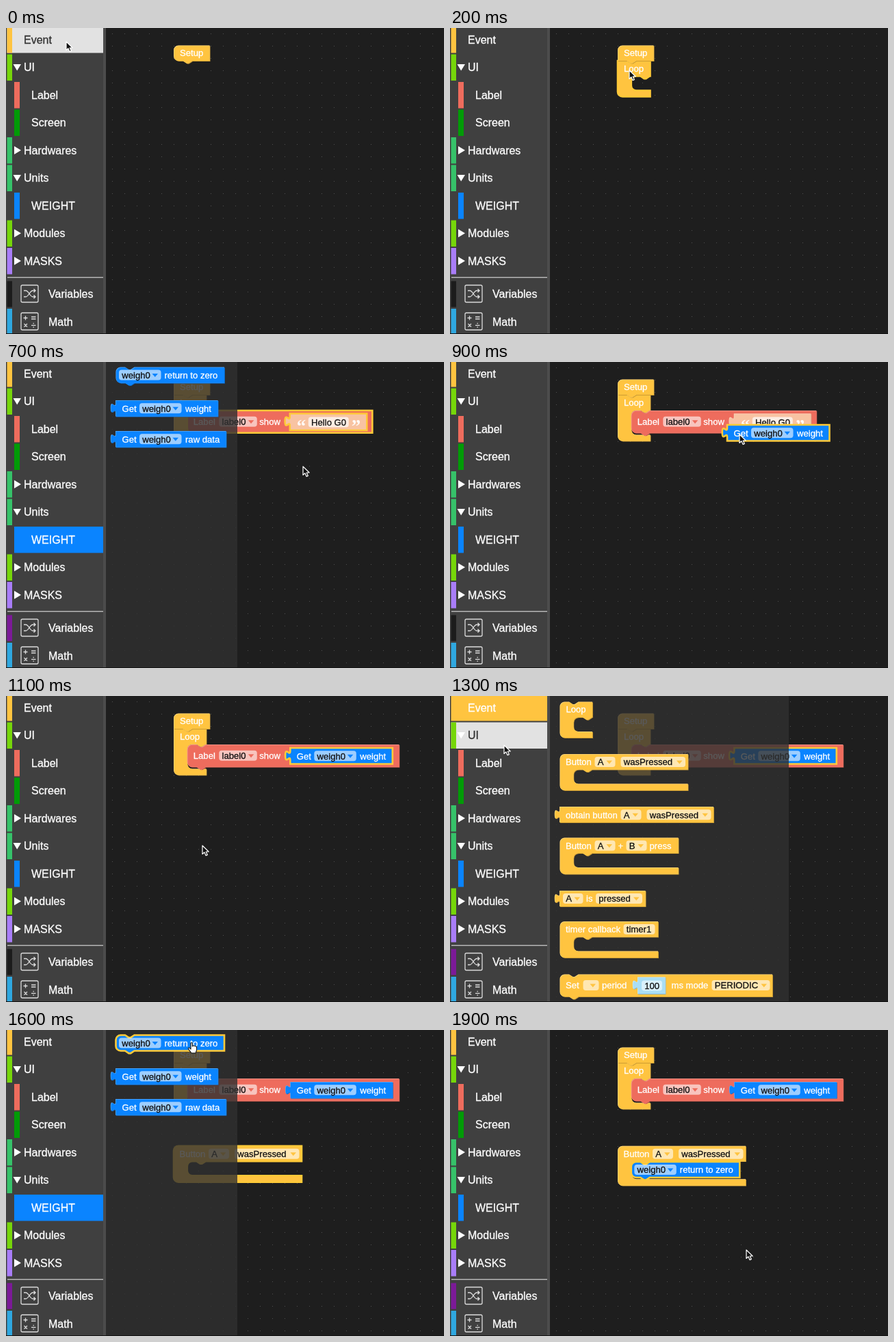
Recreate the animation shown at these times as an HTML page with a canvas. Size 640 by 448 pixels, loop 2 s.

```html
<!DOCTYPE html>
<html lang="en">
<head>
<meta charset="utf-8">
<title>Block editor</title>
<style>
  html, body { margin: 0; width: 100%; height: 100%; overflow: hidden; background: #1e1e1e; }
  canvas { display: block; width: 640px; height: 448px; }
</style>
</head>
<body>
<canvas id="stage" width="640" height="448"></canvas>
<script>
const c = document.getElementById('stage').getContext('2d');
const SANS = '"Liberation Sans", Arial, sans-serif';
const YELLOW = '#ffc440', RED = '#ee6c5d', BLUE = '#0a84ff', GREEN = '#36c269', LIME = '#76d60a';
const GLOW = '#ffca38', OLIVE = 'rgba(144,135,98,.65)', OLIVE_EDGE = '#a18c42';

// name, colour, indent, arrow (1 open, 2 closed)
const ROWS = [
  ['Event', YELLOW], ['UI', LIME, 0, 1], ['Label', RED, 1], ['Screen', '#009b06', 1],
  ['Hardwares', GREEN, 0, 2], ['Units', GREEN, 0, 1], ['WEIGHT', BLUE, 1],
  ['Modules', LIME, 0, 2], ['MASKS', '#a97df8', 0, 2]
];

function rect(x, y, w, h, fill) {
  c.fillStyle = fill;
  c.fillRect(x, y, w, h);
}
function text(str, x, y, fill = '#fff', size = 13.1) {
  c.font = size + 'px ' + SANS;
  c.fillStyle = c.strokeStyle = fill;
  c.lineWidth = 0.3;
  c.fillText(str, x, y);
  c.strokeText(str, x, y);
}
function poly(fill, ...points) {
  c.fillStyle = fill;
  c.beginPath();
  points.forEach(([x, y]) => c.lineTo(x, y));
  c.fill();
}
function at(x, y, draw) {
  c.save();
  c.translate(x, y);
  draw();
  c.restore();
}

// Block outlines
const NOTCH = 'l5.4 3.6h2.7l5.4-3.6', TAIL = 'l-5.4 3.6h-2.7l-5.4-3.6';

function statement(w, h, { mouth = 0, tl = 7, bl = 7, notch = true, tail = true } = {}) {
  const cavity = `V22.5H46.8${TAIL}h-6.3a7.2 7.2 0 0 0-7.2 7.2V${15.3 + mouth}a7.2 7.2 0 0 0 7.2 7.2H${w}`;
  return `M0 ${tl}a${tl} ${tl} 0 0 1 ${tl} ${-tl}` + (notch ? 'H13.5' + NOTCH : '') + `H${w}` +
    (mouth ? cavity : '') + `V${h}` + (tail ? 'H27' + TAIL : '') +
    `H${bl}a${bl} ${bl} 0 0 1 ${-bl} ${-bl}z`;
}
const value = (w, h) =>
  `M0 0H${w}V${h}H0V18c0-9-7.2 7.2-7.2-6.75s7.2 2.25 7.2-6.75z`;

function shape(d, fill, edge) {
  const path = new Path2D(d);
  const paint = (...fills) => fills.forEach(f => {
    c.fillStyle = f;
    c.fill(path);
  });
  if (edge) {
    paint(fill);
    c.strokeStyle = edge;
    c.lineWidth = 2.6;
    c.stroke(path);
    return;
  }
  // Bevel: dark below right, light above left
  at(0.9, 0.9, () => paint(fill, 'rgba(0,0,0,.2)'));
  paint(fill, 'rgba(255,255,255,.3)');
  at(0, 0, () => {
    c.clip(path);
    c.translate(0.7, 0.7);
    paint(fill);
  });
}
function field(str, x, y, w, arrow, fill = 'rgba(255,255,255,.6)') {
  c.fillStyle = fill;
  c.beginPath();
  c.roundRect(x, y - 7.5, w, 15, 4);
  c.fill();
  text(str, x + 4.3, y + 4.7, '#111');
  if (arrow) poly(arrow, [x + w - 13, y - 2], [x + w - 4.5, y - 2], [x + w - 8.75, y + 3]);
}
const say = (str, x, y) => text(str, x, y + 4.7);

// Blocks
const setup = joined => at(245, 25.5, () => {
  shape(statement(52.5, 22.5, { notch: false, bl: joined ? 0 : 7 }), YELLOW);
  say('Setup', 9, 11);
});
function loop(x, y, mouth, tl, edge) {
  at(x, y, () => {
    shape(statement(47.5, 31.5 + mouth, { mouth, tl, tail: false }), YELLOW, edge);
    say('Loop', 9, 11);
  });
}
function hello(x, y, fill, edge) {
  at(x, y, () => {
    shape(value(112.5, 24.5), fill, edge);
    field('Hello G0', 27, 12.5, 59, null, 'rgba(255,255,255,.7)');
    c.font = 'bold 27px "Liberation Serif", serif';
    c.fillStyle = 'rgba(255,255,255,.9)';
    c.fillText('“', 10, 27.5);
    c.fillText('”', 90, 27.5);
  });
}
function weighValue(x, y, tail, w, edge) {
  at(x, y, () => {
    shape(value(w, 23.5), BLUE, edge);
    say('Get', 9.5, 11.8);
    field('weigh0', 35, 11.8, 61.5, BLUE);
    say(tail, 102, 11.8);
  });
}
const getWeight = (x, y, edge) => weighValue(x, y, 'weight', 149.5, edge);

function label(x, y, child, { fill = RED, childFill = '#f8c3a2', edge, childEdge } = {}) {
  at(x, y, () => {
    shape(statement(child === 'get' ? 309.5 : 270.5, 32.8), fill, edge);
    say('Label', 9, 16.3);
    field('label0', 46.5, 16.3, 55.5, RED);
    say('show', 105.5, 16.3);
    if (child === 'get') getWeight(150.5, 5, childEdge);
    else hello(150, 4.5, childFill, edge);
  });
}
function zero(x, y, edge) {
  at(x, y, () => {
    shape(statement(158.5, 23), BLUE, edge);
    field('weigh0', 4.5, 11.5, 61.5, BLUE);
    say('return to zero', 71, 11.5);
  });
}
function button(x, y, mouth = 21, edge) {
  at(x, y, () => {
    shape(statement(187, 32 + mouth, { mouth, notch: false, tail: false }), YELLOW, edge);
    say('Button', 8.5, 11.5);
    field('A', 51, 11.5, 30, YELLOW);
    field('wasPressed', 89, 11.5, 94.5, YELLOW);
  });
}

// Flyouts: right edge and contents
const FLYOUTS = {
  event: [495, () => {
    loop(160.5, 8.5, 21, 7);
    button(160.5, 85);
    at(160, 162, () => {
      shape(value(225, 23), YELLOW);
      say('obtain button', 9, 11.8);
      field('A', 89.5, 11.8, 30, YELLOW);
      field('wasPressed', 127.5, 11.8, 94, YELLOW);
    });
    at(160.5, 207.5, () => {
      shape(statement(173, 53, { mouth: 21, notch: false, tail: false }), YELLOW);
      say('Button', 8.5, 11.5);
      field('A', 51, 11.5, 30, YELLOW);
      say('+', 85, 11.5);
      field('B', 97, 11.5, 30, YELLOW);
      say('press', 131, 11.5);
    });
    at(160, 285, () => {
      shape(value(125.5, 23), YELLOW);
      field('A', 5, 11.5, 29.5, YELLOW);
      say('is', 39, 11.5);
      field('pressed', 53, 11.5, 68, YELLOW);
    });
    at(160.5, 330, () => {
      shape(statement(143.5, 53, { mouth: 21, notch: false, tail: false }), YELLOW);
      say('timer callback', 8.5, 11.5);
      field('timer1', 93, 11.5, 46);
    });
    at(160.5, 407.5, () => {
      shape(statement(310.5, 32.5), YELLOW);
      say('Set', 8.5, 16);
      field('', 34, 16, 23, YELLOW);
      say('period', 61.5, 16);
      at(113.5, 4, () => {
        shape(value(40.5, 24.5), '#a9def5');
        field('100', 6, 12.5, 30, null, '#d9f1fb');
      });
      say('ms mode', 163, 16);
      field('PERIODIC', 222, 16, 85, YELLOW);
    });
  }],
  label: [444, () => label(160.5, 8, 'hello')],
  weight: [338, glow => {
    zero(160.5, 7.5, glow);
    getWeight(160, 56);
    weighValue(160, 101, 'raw data', 161.5);
  }]
};

function sidebar({ hover, sel, dark }) {
  rect(0, 0, 142, 448, '#404040');
  rect(142, 0, 4, 448, '#4c4c4c');
  ROWS.forEach(([name, colour, sub, arrow], i) => {
    const y = -2 + 40.5 * i, x = sub ? 12 : 1.5;
    if (i === hover) rect(x, y, 142 - x, 38.5, '#e2e2e2');
    rect(x, y, i === sel ? 142 - x : sub ? 8 : 7.5, 38.5, colour);
    const m = y + 19;
    if (arrow === 1) poly('#fff', [10.5, m - 4.5], [22, m - 4.5], [16.2, m + 5]);
    if (arrow === 2) poly('#fff', [12, m - 6], [22, m], [12, m + 6]);
    text(name, sub ? 37 : 26, m + 5.8, i === hover ? '#333' : '#fff', 16);
  });
  rect(2, 364.5, 140, 1.5, '#b5b5b5');
  rect(1.5, 370.5, 7.5, 38, dark ? '#1c1c1c' : '#7c1a98');
  rect(1.5, 411, 7.5, 36, '#2fa8e0');
  text('Variables', 62, 395, '#fff', 16);
  text('Math', 62, 435.5, '#fff', 16);

  c.strokeStyle = '#dcdcdc';
  c.lineWidth = 1.3;
  c.stroke(new Path2D('M24 376.5h21a2 2 0 0 1 2 2v21a2 2 0 0 1-2 2h-21a2 2 0 0 1-2-2v-21a2 2 0 0 1 2-2z' +
    'M24 417h21a2 2 0 0 1 2 2v21a2 2 0 0 1-2 2h-21a2 2 0 0 1-2-2v-21a2 2 0 0 1 2-2z' +
    'M26 384.5h3c4 0 6 9 10 9h4M26 393.5h3c4 0 6-9 10-9h4M40.5 382l2.5 2.5-2.5 2.5M40.5 391l2.5 2.5-2.5 2.5' +
    'M25.5 424.5h6M28.5 421.5v6M37 423h6.5M37 426h6.5M26.5 433l4.5 4.5M31 433l-4.5 4.5M37 435.3h6.5' +
    'M40.2 431.8v1.4M40.2 437.3v1.4'));
}

function cursor([x, y], hand) {
  const arrow = 'M0 0V12.5L2.9 9.8L5 14.6L7.3 13.6L5.2 9H9.2z';
  const grip = 'M-3-5c0-2 2.4-2 2.4 0v4l.6-1 2 .2 2 .6 1.5 1v5l-1.5 4h-6l-4.5-6c-.6-1.8 1.3-2.4 2.3-1l1.2 1.2z';
  at(x, y, () => {
    const path = new Path2D(hand ? grip : arrow);
    c.fillStyle = hand ? '#fff' : '#111';
    c.strokeStyle = hand ? '#222' : '#fff';
    c.lineWidth = 1.2;
    c.lineJoin = 'round';
    c.fill(path);
    c.stroke(path);
  });
}

// One pose per tenth of a second
const ghost = { fill: OLIVE, childFill: 'transparent', edge: OLIVE_EDGE };
const withLabel = { loop: 1, child: 'hello' };
const withGet = { loop: 1, child: 'get' };
const POSES = [
  { hover: 0, cur: [88, 20], dark: 1 },
  { sel: 0, fly: 'event', cur: [180, 22], hand: 1, dark: 1 },
  { loop: 1, glow: 'loop', cur: [262, 62], dark: 1 },
  { loop: 1, sel: 2, fly: 'label', cur: [194, 31], hand: 1, dark: 1 },
  { loop: 1, drag: () => label(195.8, 60, 'hello', ghost), cur: [229, 82], dark: 1 },
  { ...withLabel, glow: 'label', cur: [299, 96], dark: 1 },
  { ...withLabel, glow: 'label', hover: 6, cur: [100, 256] },
  { ...withLabel, glow: 'label', sel: 6, fly: 'weight', cur: [434, 153] },
  { ...withLabel, drag: () => getWeight(270, 118, GLOW), cur: [288, 132] },
  { ...withLabel, drag: () => getWeight(405, 92, GLOW), cur: [423, 106], dark: 1 },
  { ...withGet, glow: 'get', cur: [432, 95], dark: 1 },
  { ...withGet, glow: 'get', cur: [287, 219], dark: 1 },
  { ...withGet, glow: 'get', hover: 0, cur: [80, 22] },
  { ...withGet, glow: 'get', sel: 0, hover: 1, fly: 'event', cur: [79, 72] },
  { ...withGet, glow: 'get', sel: 0, fly: 'event', cur: [188, 98], hand: 1 },
  { ...withGet, button: 1, glow: 'button', cur: [272, 184] },
  { ...withGet, button: 1, glow: 'button', sel: 6, fly: 'weight', flyGlow: GLOW, cur: [273, 25], hand: 1 },
  { ...withGet, button: 1, drag: () => zero(272, 178, GLOW), cur: [384, 196] },
  { ...withGet, button: 1, zero: 1, glow: 'zero', cur: [378, 210] },
  { ...withGet, button: 1, zero: 1, glow: 'zero', cur: [433, 322] }
];

function draw(pose) {
  const edge = part => pose.glow === part ? GLOW : undefined;
  rect(0, 0, 640, 448, '#1e1e1e');
  for (let x = 155; x < 640; x += 18)
    for (let y = 8; y < 448; y += 18) rect(x, y, 1, 1, '#505050');

  if (pose.loop) loop(245, 48, pose.child ? 36 : 21, 0, edge('loop'));
  setup(pose.loop);
  if (pose.child) label(264.8, 71, pose.child, { edge: edge('label'), childEdge: edge('get') });
  if (pose.button) button(245, 169.7, pose.zero ? 26 : 21, edge('button'));
  if (pose.zero) zero(264.8, 193, edge('zero'));
  if (pose.drag) pose.drag();

  if (pose.fly) {
    const [right, contents] = FLYOUTS[pose.fly];
    rect(146, 0, right - 146, 448, 'rgba(48,48,48,.8)');
    contents(pose.flyGlow);
  }
  sidebar(pose);
  rect(0, 447, 640, 1, '#141414');
  cursor(pose.cur, pose.hand);
}

const start = performance.now();
function tick() {
  const time = (performance.now() - start) % 2000;
  draw(POSES[Math.floor(time / 100)]);
  requestAnimationFrame(tick);
}
tick();
</script>
</body>
</html>
```
